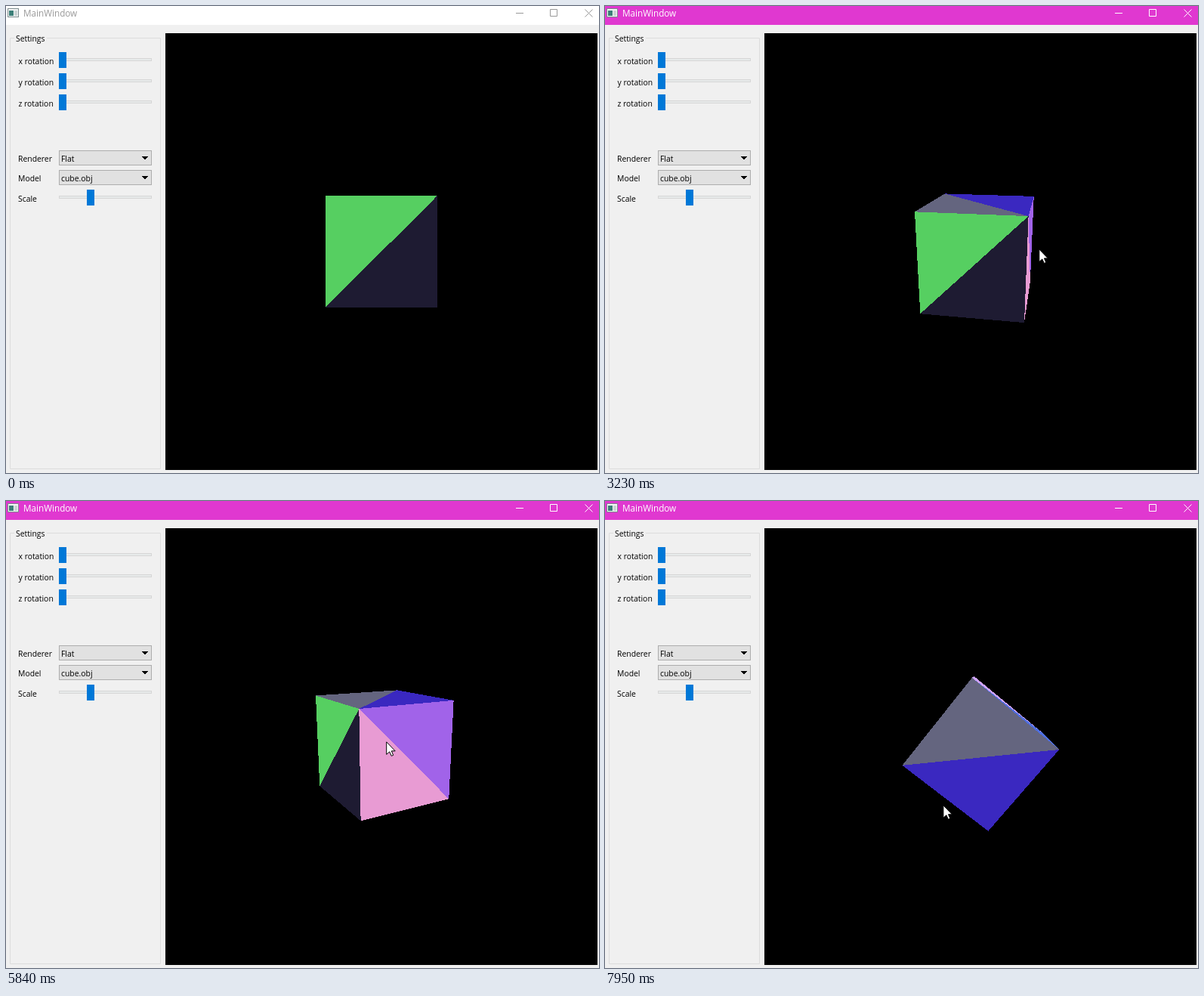
An HTML page that plays this animation: 785x618 px, repeating every 8 s.

```html
<!DOCTYPE html>
<html lang="en">
<head>
<meta charset="utf-8">
<title>MainWindow</title>
<style>
  html, body { margin: 0; width: 100%; height: 100%; overflow: hidden; background: #f0f0f0; }
  svg { position: absolute; left: 0; top: 0; width: 785px; height: 618px; }
  text { font: 10.4px "Open Sans", "Noto Sans", sans-serif; fill: #000; }
  #bar { fill: #fff; }
  #caption { font-size: 11.7px; fill: #999; }
  #buttons { fill: none; stroke: #999; }
  .active #bar { fill: #e038d0; }
  .active #caption { fill: #fff; }
  .active #buttons { stroke: #fff; }
  #cube, #combo { shape-rendering: crispEdges; }
</style>
</head>
<body>
<svg id="ui" viewBox="0 0 785 618">
  <defs>
    <g id="groove"><rect x="70.5" y="8.5" width="122" height="3" fill="#e7eaea" stroke="#d6d6d6"/></g>
    <rect id="handle" width="10" height="21" fill="#0078d7"/>
    <g id="combo">
      <rect x="70.5" y=".5" width="122" height="19" fill="#e1e1e1" stroke="#adadad"/>
      <path d="M179 8h9l-4.5 4.5z"/>
    </g>
  </defs>
  <rect id="bar" width="785" height="25"/>
  <g>
    <rect x="2.5" y="3.5" width="14" height="11" fill="#f4f6f6" stroke="#7c8b8d"/>
    <rect x="4" y="6" width="6" height="7" fill="#3c7f78"/>
    <rect x="11" y="6" width="4" height="7" fill="#c9d3d4"/>
  </g>
  <text id="caption" x="23" y="14">MainWindow</text>
  <path id="buttons" d="M675 9.5h10M720.5 4.5h9v9h-9zM766.5 4.5l10 10M776.5 4.5l-10 10"/>
  <path d="M11 42.5H5.5v570h199v-570H54" fill="none" stroke="#dcdcdc"/>
  <text x="13" y="47">Settings</text>
  <text x="16.5" y="77">x rotation</text>
  <text x="16.5" y="105">y rotation</text>
  <text x="16.5" y="133">z rotation</text>
  <use href="#groove" y="61"/><use href="#handle" x="70" y="61"/>
  <use href="#groove" y="89"/><use href="#handle" x="70" y="89"/>
  <use href="#groove" y="117"/><use href="#handle" x="70" y="117"/>
  <use href="#combo" y="191"/><use href="#combo" y="217"/>
  <text x="16" y="206">Renderer</text><text x="73" y="206">Flat</text>
  <text x="16" y="232">Model</text><text x="73" y="232">cube.obj</text>
  <text x="16" y="259">Scale</text>
  <use href="#groove" y="243"/><use href="#handle" x="107" y="243"/>
  <rect x="211" y="36" width="572" height="578"/>
  <g id="cube"></g>
  <path id="pointer" d="M0 0v16.5l4-3.5 2.5 5.5 2.5-1-2.4-5.5h4.9z" fill="#fff" stroke="#000"/>
</svg>
<script>
const LOOP = 8000, ENTER = 300, CLICK = 700, LAG = 40;
const CX = 497, CY = 325, DIST = 7.76, FOCAL = 500.6;

// Turning points of the drag, as time and degrees
const yaw = track([700, 0], [1480, -200], [1880, -111.8], [2640, -5], [3020, -5],
  [3230, -10.2], [3800, -55], [5840, -60], [6870, -99], [7950, -129.1]);
const pitch = track([700, 0], [1080, 18.5], [3780, 17.6], [4100, -30.8], [4390, -58], [4530, -58],
  [4950, 70], [5450, -45], [5650, 45], [5840, 14.8], [6180, 16], [6870, -41.7], [7950, 101.3], [8000, 98.5]);
// Sideways pixels the pointer loses against the yaw
const slip = track([700, 0], [1880, -8], [3230, -2], [4100, -10], [5840, -25], [6870, 1], [7950, -12]);

// Corner bits: 1 = right, 2 = top, 4 = front. Each face is split from its first to its third corner.
const FACES = [
  [[4, 6, 7, 5], '#56cf61', '#1e1b32'],
  [[2, 3, 7, 6], '#3a28c0', '#64657f'],
  [[7, 3, 1, 5], '#a163e9', '#e89bd3'],
  [[2, 0, 1, 3], '#2a5a10', '#27107f'],
  [[5, 1, 0, 4], '#4c6d76', '#902606'],
  [[6, 4, 0, 2], '#cfa3f7', '#4f6fe0']
];

const ui = document.getElementById('ui');
const pointer = document.getElementById('pointer');
const cube = document.getElementById('cube');
const faces = FACES.map(([ids, ...colors]) => ({ ids, parts: colors.map(addPolygon) }));

function addPolygon(color) {
  const shape = document.createElementNS('http://www.w3.org/2000/svg', 'polygon');
  shape.setAttribute('fill', color);
  return cube.appendChild(shape);
}

// Monotone cubic through the points
function track(...points) {
  const slopes = points.map((p, i) => {
    const a = points[i - 1], c = points[i + 1];
    if (!a || !c) return 0;
    const m = (p[1] - a[1]) / (p[0] - a[0]);
    const n = (c[1] - p[1]) / (c[0] - p[0]);
    return m * n > 0 ? 2 * m * n / (m + n) : 0;
  });
  return t => {
    const next = points.findIndex(p => p[0] > t);
    if (next === 0) return points[0][1];
    if (next < 0) return points[points.length - 1][1];
    const i = next - 1, [t0, a] = points[i], [t1, b] = points[next];
    const h = t1 - t0, s = (t - t0) / h;
    return a + (b - a) * s * s * (3 - 2 * s)
      + h * s * (1 - s) * ((1 - s) * slopes[i] - s * slopes[next]);
  };
}

function project(i, yaw, pitch) {
  const x = i & 1 ? 1 : -1, y = i & 2 ? 1 : -1, z = i & 4 ? 1 : -1;
  const x1 = x * Math.cos(yaw) + z * Math.sin(yaw);
  const z1 = z * Math.cos(yaw) - x * Math.sin(yaw);
  const y2 = y * Math.cos(pitch) - z1 * Math.sin(pitch);
  const z2 = y * Math.sin(pitch) + z1 * Math.cos(pitch);
  const k = FOCAL / (DIST - z2);
  return [CX + x1 * k, CY - y2 * k];
}

function drawCube(yaw, pitch) {
  const corners = Array.from({ length: 8 }, (_, i) => project(i, yaw, pitch));
  for (const { ids, parts } of faces) {
    const [a, b, c, d] = ids.map(i => corners[i]);
    const facing = (b[0] - a[0]) * (c[1] - a[1]) - (b[1] - a[1]) * (c[0] - a[0]) > 0;
    parts[0].setAttribute('points', facing ? [a, b, c, d].join(' ') : '');
    parts[1].setAttribute('points', facing ? [a, c, d].join(' ') : '');
  }
}

// One degree per pixel: the cube follows the pointer a moment later
function movePointer(t) {
  const left = Math.max(0, (CLICK - t) / (CLICK - ENTER)) ** 2;
  const x = 589 + yaw(t + LAG) + slip(t) + 11 * left;
  const y = 304 + pitch(t + LAG) + 263 * left;
  pointer.setAttribute('transform', `translate(${x} ${y})`);
  pointer.setAttribute('visibility', t < ENTER ? 'hidden' : 'visible');
}

function render(t) {
  const rad = Math.PI / 180;
  ui.classList.toggle('active', t >= CLICK);
  drawCube(yaw(t) * rad, pitch(t) * rad);
  movePointer(t);
}

const start = performance.now();
function tick() {
  render((performance.now() - start) % LOOP);
  requestAnimationFrame(tick);
}
tick();
</script>
</body>
</html>
```
